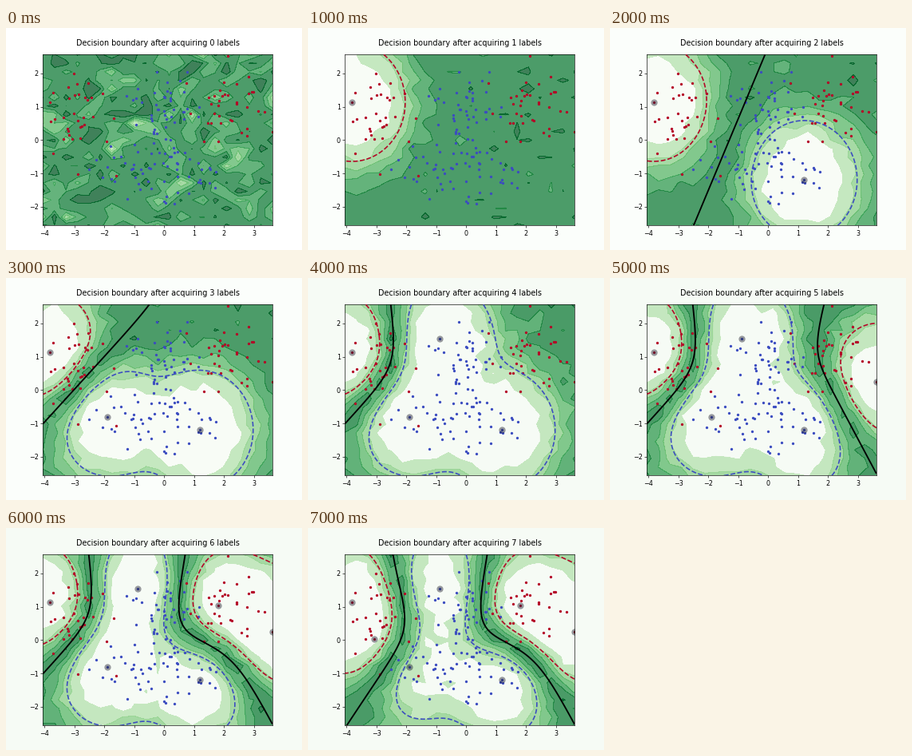
A matplotlib script that plays this animation: 371x278 px, repeating every 8 s.

```python
import numpy as np
import matplotlib.pyplot as plt
from matplotlib.animation import FuncAnimation

DPI = 58
RED, BLUE = "#b40426", "#3b4cc0"
XLIM, YLIM = (-4.053, 3.613), (-2.566, 2.566)
LENGTH = 1.3      # kernel length scale
POWER = 1.65      # how same-class labels add up
MARGIN = 0.392    # score on the dashed lines

plt.rcParams["font.family"] = "DejaVu Sans"

# acquired labels in order; sign + is blue, - is red
LABELS = np.array([(-3.82, 1.14), (1.19, -1.19), (-1.90, -0.81), (-0.88, 1.54),
                   (3.62, 0.25), (1.80, 1.04), (-3.08, 0.03)])
SIGNS = np.array([-1, 1, 1, 1, -1, -1, -1])


def cloud(rng, center, spread, count):
    return rng.normal(center, spread, (count, 2))


rng = np.random.default_rng(3)
reds = np.vstack((cloud(rng, (-3.05, 0.85), (0.7, 0.75), 38),
                  cloud(rng, (2.0, 1.0), (0.55, 0.6), 34),
                  LABELS[SIGNS < 0]))
blues = np.vstack((cloud(rng, (0.1, 0.85), (0.65, 0.55), 38),
                   cloud(rng, (-0.9, -0.8), (0.75, 0.55), 36),
                   cloud(rng, (0.7, -0.9), (0.55, 0.6), 28),
                   LABELS[SIGNS > 0]))


def mesh(count):
    return np.meshgrid(np.linspace(*XLIM, count), np.linspace(*YLIM, count))


def pull(x, y, labels):
    """Combined kernel strength of one class."""
    total = np.zeros_like(x)
    for cx, cy in labels:
        dist = (x - cx) ** 2 + (y - cy) ** 2
        total += np.exp(-POWER * dist / (2 * LENGTH ** 2))
    return total ** (1 / POWER)


def score(x, y, n):
    seen, sign = LABELS[:n], SIGNS[:n]
    return pull(x, y, seen[sign > 0]) - pull(x, y, seen[sign < 0])


def uncertainty(x, y, n):
    """Noisy uncertainty, highest along the boundary and far from labels."""
    rng = np.random.default_rng(40 + n)
    if n == 0:
        return 1 - 0.125 * rng.gamma(3, 0.65, x.shape)
    falloff = 1 / (1 + (score(x, y, n) / MARGIN) ** 2)
    noise = 0.045 * rng.standard_normal(x.shape) * (0.5 + 0.5 * falloff)
    return np.minimum(0.82 * falloff + noise, 0.999)


coarse, fine = mesh(21), mesh(150)
levels = np.linspace(0.25, 1, 7)

fig, ax = plt.subplots(figsize=(371 / DPI, 278 / DPI), dpi=DPI)


def draw(n):
    ax.clear()
    tint = "white" if n == 0 else "#fbfefb" if n < 4 else "#f6fbf5"
    fig.set_facecolor(tint)
    ax.set_facecolor(tint)

    u = uncertainty(*coarse, n)
    shade = dict(levels=levels, cmap="Greens", vmin=0, vmax=1)
    ax.contourf(*coarse, u, alpha=0.75, extend="min", **shade)
    ax.contour(*coarse, u, linewidths=0.7, **shade)

    for points, color in ((reds, RED), (blues, BLUE)):
        ax.scatter(*points.T, s=17, color=color, linewidths=0, zorder=2)
    ax.scatter(*LABELS[:n].T, s=105, color="#202030", alpha=0.45,
               linewidths=0, zorder=2.5)

    if n:
        ax.contour(*fine, score(*fine, n), [-MARGIN, 0, MARGIN],
                   colors=[RED, "black", BLUE], linestyles=["--", "-", "--"],
                   linewidths=[2, 2.3, 2], zorder=3)

    ax.set(xlim=XLIM, ylim=YLIM, xticks=range(-4, 4), yticks=range(-2, 3))
    ax.set_title(f"Decision boundary after acquiring {n} labels", pad=13.5)
    return []


anim = FuncAnimation(fig, draw, frames=8, interval=1000, repeat=True,
                     repeat_delay=0, init_func=lambda: draw(0))
plt.show()
```
